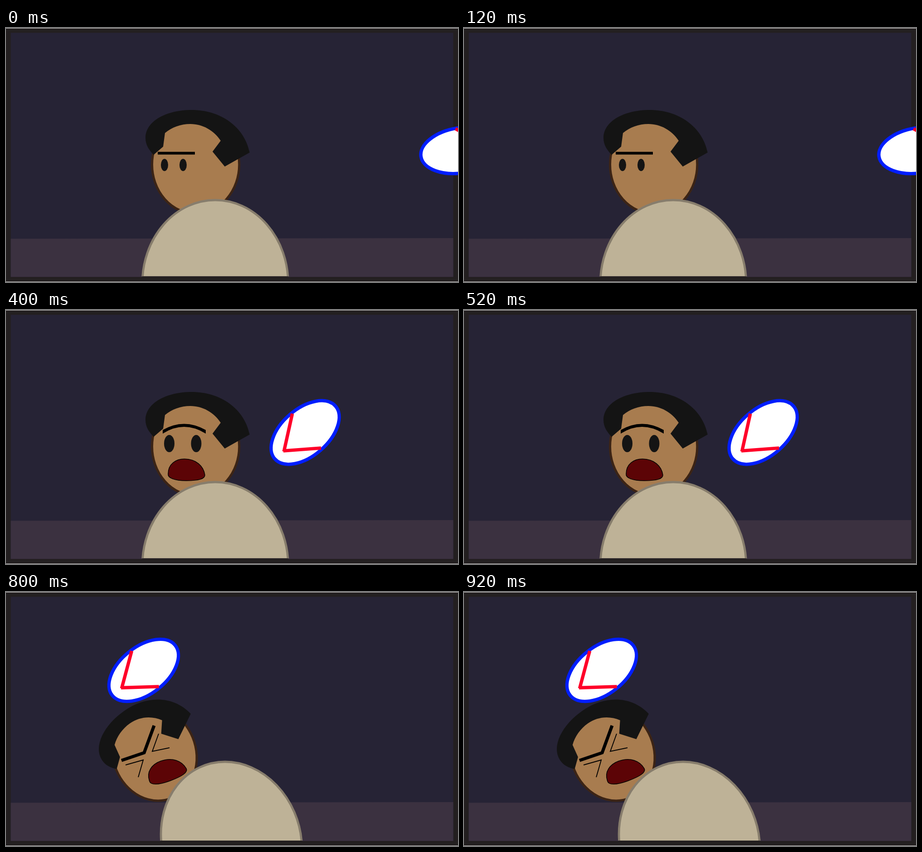
Recreate the animation shown at these times as an HTML page with a canvas. Size 998 by 561 pixels, loop 1000 ms.

```html
<!DOCTYPE html>
<html lang="en">
<head>
<meta charset="utf-8">
<title>Ball to the head</title>
<style>
  html, body { margin: 0; width: 100%; height: 100%; overflow: hidden; background: #fff; }
  canvas { display: block; }
</style>
</head>
<body>
<canvas id="stage" width="998" height="561"></canvas>
<script>
const ctx = document.getElementById('stage').getContext('2d');
const LOOP = 1000, STEP = 200;
const DARK = '#231f20', HAIR = '#141414', BLACK = '#000';

const hair = new Path2D('M326 280C316 270 308 258 308 243C308 205 355 181 410 181' +
  'C473 181 526 217 538 275L483 306L456 273L474 249C459 226 434 212 407 212' +
  'C386 212 366 219 351 232L347 262Z');
const mouth = new Path2D('M358 362C358 340 375 329 394 329C420 329 436 345 439 364' +
  'C440 373 425 377 398 377C372 377 357 371 358 362Z');
const archedBrow = new Path2D('M346 265Q393 238 441 265V273Q393 243 346 273Z');

// head and mouth: matrices; body: [x, y, rx, ry, shear, bottom]; ball: [x, y, degrees, ry]
const still = [1, 0, 0, 1, 0, 0];
const upright = [462, 564, 161, 184, 0, 548.5];
const poses = [
  { head: still, body: upright, ball: [1004, 270.3, 171, 53.5],
    brow: [335, 276.5, 417, 276.5], eyes: [[350, 302.5, 8, 13.5], [391, 302.5, 8, 13.5]] },
  { head: still, body: upright, ball: [839.5, 275.5, 60, 55.6],
    brow: [338, 273, 420, 273], eyes: [[354, 306.5, 11.5, 19], [413.5, 307, 11.5, 19]],
    mouth: [0.43, 0, 0, 0.3, 204, 243.3] },
  { head: still, body: upright, ball: [660.5, 270.5, -41, 55.6],
    arched: true, eyes: [[360.5, 295, 11.5, 19], [420, 295, 11.5, 19]], mouth: still },
  { head: [1, 0, 0, 1, -10.7, 15], body: [451.5, 580, 161, 184, 0, 548],
    ball: [469, 269.7, 55, 55.6],
    brow: [333, 285, 390, 300, 440, 272], browWidth: 7,
    squint: [[334, 298, 378, 312, 342, 336], [440, 291, 410, 309, 442, 321]],
    tufts: [[365, 180, 396, 203], [343, 204, 390, 214], [350, 234, 390, 228]],
    mouth: [1, 0, 0, 1, -1, 7.7] },
  { head: [0.783, -0.556, 0.506, 0.82, -152.5, 342.7],
    body: [497.7, 551, 155, 176, 0.08, 549], ball: [304, 173, -38.5, 55.6],
    brow: [255, 372, 305, 355, 327, 295], browWidth: 7,
    squint: [[264, 382, 303, 371, 292, 409], [337, 313, 323, 352, 361, 344]],
    mouth: [0.996, -0.363, 0.342, 0.94, -163.6, 207.3] }
];

function paint(path, fill, stroke, width) {
  if (fill) { ctx.fillStyle = fill; ctx.fill(path); }
  if (stroke) { ctx.strokeStyle = stroke; ctx.lineWidth = width; ctx.stroke(path); }
}

function ellipse(x, y, rx, ry) {
  const p = new Path2D();
  p.ellipse(x, y, rx, ry, 0, 0, Math.PI * 2);
  return p;
}

function line(pts, color, width) {
  const p = new Path2D();
  for (let i = 0; i < pts.length; i += 2) p.lineTo(pts[i], pts[i + 1]);
  paint(p, null, color, width);
}

function warp(path, m) {
  const p = new Path2D();
  p.addPath(path, new DOMMatrix(m));
  return p;
}

function room() {
  ctx.fillStyle = '#fff';
  ctx.fillRect(0, 0, 998, 561);
  ctx.fillStyle = DARK;
  ctx.fillRect(0, 0.8, 998, 559.4);
  ctx.fillStyle = '#262335';
  ctx.fillRect(10.5, 10.5, 977, 539);
  paint(new Path2D('M10.5 465.5L987.5 464V549.7H10.5Z'), '#3b3140');
}

function face(pose) {
  paint(warp(ellipse(418.7, 301.5, 96.2, 108.5), pose.head), '#a87c4f', '#3c2415', 5);
  paint(warp(hair, pose.head), HAIR);
  for (const e of pose.eyes || []) paint(ellipse(...e), HAIR);
  for (const s of pose.squint || []) line(s, BLACK, 1.9);
  for (const t of pose.tufts || []) line(t, BLACK, 5);
  if (pose.arched) paint(archedBrow, BLACK);
  if (pose.brow) line(pose.brow, BLACK, pose.browWidth || 6);
  if (pose.mouth) paint(warp(mouth, pose.mouth), '#5c0406', BLACK, 1.5);
}

function body([x, y, rx, ry, shear, bottom]) {
  ctx.save();
  ctx.beginPath();
  ctx.rect(0, 0, 998, bottom);
  ctx.clip();
  paint(warp(ellipse(0, 0, rx, ry), [1, 0, shear, 1, x, y]), '#beb297', '#877d6c', 4.8);
  ctx.restore();
  ctx.fillStyle = DARK;
  ctx.fillRect(x - rx, bottom, rx * 2, 550 - bottom);
}

function ball([x, y, deg, ry]) {
  ctx.save();
  ctx.translate(x, y);
  ctx.rotate(deg * Math.PI / 180);
  paint(ellipse(0, 0, 88.8, ry - 3.6), '#fff', '#001eff', 7.4);
  line([6, -50, -63, 1], '#ff0029', 7.4);
  line([4, 49, -63, -1], '#ff0029', 7.4);
  ctx.restore();
}

function draw(ms) {
  const pose = poses[Math.floor((ms % LOOP) / STEP)];
  room();
  face(pose);
  body(pose.body);
  ball(pose.ball);
}

const start = performance.now();
function tick() {
  draw(performance.now() - start);
  requestAnimationFrame(tick);
}
tick();
</script>
</body>
</html>
```
